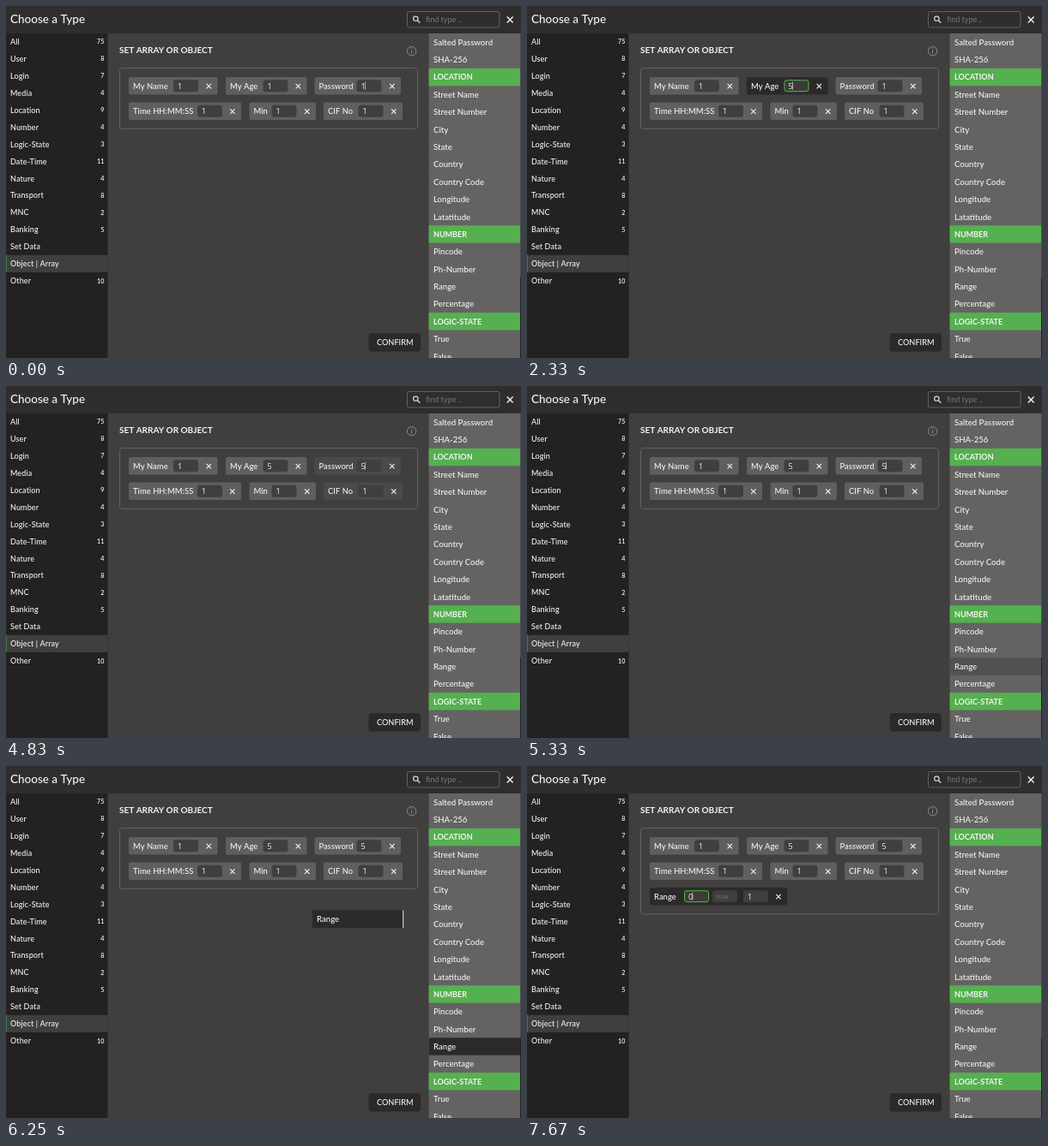
Write an HTML page with a canvas that moves like this. It is 600 px wide and 411 px high and loops after 8 s.

```html
<!DOCTYPE html>
<html lang="en">
<head>
<meta charset="utf-8">
<title>Choose a Type</title>
<style>
html, body { margin: 0; width: 100%; height: 100%; overflow: hidden; background: #403f3e; }
canvas { display: block; width: 600px; height: 411px; }
</style>
</head>
<body>
<canvas id="stage"></canvas>
<script>
const W = 600, H = 411, LOOP = 8000;
const canvas = document.getElementById('stage');
const ctx = canvas.getContext('2d');
const scale = window.devicePixelRatio || 1;
canvas.width = W * scale;
canvas.height = H * scale;

const FONT = 'Lato, "Open Sans", sans-serif';
const DIGITS = '"Open Sans", "Noto Sans", sans-serif';
const WHITE = '#f4f4f3', DARK = '#2b2a29', GREEN = '#55b04f', LINE = '#62615f';
const CHIP = [96, 95, 94], CHIP_HOVER = [43, 42, 41];
const ROW = [100, 99, 98];

const types = [
  ['All', 75], ['User', 8], ['Login', 7], ['Media', 4], ['Location', 9],
  ['Number', 4], ['Logic-State', 3], ['Date-Time', 11], ['Nature', 4],
  ['Transport', 8], ['MNC', 2], ['Banking', 5], ['Set Data', ''],
  ['Object | Array', ''], ['Other', 10]
];
const fields = [
  'Salted Password', 'SHA-256', '#LOCATION', 'Street Name', 'Street Number',
  'City', 'State', 'Country', 'Country Code', 'Longitude', 'Latatitude',
  '#NUMBER', 'Pincode', 'Ph-Number', 'Range', 'Percentage', '#LOGIC-STATE',
  'True', 'False'
];

const clamp = v => Math.max(0, Math.min(1, v));
const ramp = (t, a, b) => clamp((t - a) / (b - a));
const during = (t, a, b) => t >= a && t < b;
const ease = p => p * p * (3 - 2 * p);
const lerp = (a, b, p) => a + (b - a) * p;
const mix = (a, b, p) => `rgb(${a.map((v, i) => Math.round(lerp(v, b[i], p)))})`;
// 1 while hovered, fading in and out
const hover = (t, a, b, c, d) => ramp(t, a, b) * (1 - ramp(t, c, d));
// caret restarts its 500 ms blink at each keystroke or click
const blink = (t, start, end) => during(t, start, end) && Math.floor((t - start) / 500) % 2 === 0;

function rect(x, y, w, h, fill) {
  ctx.fillStyle = fill;
  ctx.fillRect(x, y, w, h);
}

function box(x, y, w, h, r, fill, stroke, line = 1) {
  ctx.beginPath();
  ctx.roundRect(x, y, w, h, r);
  if (fill) { ctx.fillStyle = fill; ctx.fill(); }
  if (stroke) { ctx.strokeStyle = stroke; ctx.lineWidth = line; ctx.stroke(); }
}

function text(str, x, mid, size, { color = WHITE, weight = 500, font = FONT, align = 'left', gap = 0 } = {}) {
  ctx.font = `${weight} ${size}px ${font}`;
  ctx.textAlign = align;
  ctx.letterSpacing = gap + 'px';
  ctx.fillStyle = color;
  ctx.fillText(str, x, mid + size * 0.36);
}

function path(points, color, width) {
  ctx.beginPath();
  points.forEach(([x, y, move]) => move ? ctx.moveTo(x, y) : ctx.lineTo(x, y));
  ctx.strokeStyle = color;
  ctx.lineWidth = width;
  ctx.stroke();
}

function cross(x, y, r, width) {
  path([[x - r, y - r, 1], [x + r, y + r], [x + r, y - r, 1], [x - r, y + r]], WHITE, width);
}

function ring(x, y, r, color, width) {
  ctx.beginPath();
  ctx.arc(x, y, r, 0, Math.PI * 2);
  ctx.strokeStyle = color;
  ctx.lineWidth = width;
  ctx.stroke();
}

function input(x, y, value, { hot = 0, caret = false, hint = '' } = {}) {
  box(x, y, 29, 14, 3, mix([64, 63, 62], [60, 59, 58], hot));
  if (hot > 0) {
    ctx.globalAlpha = hot;
    box(x + 0.5, y + 0.5, 28, 13, 2.5, null, GREEN);
    ctx.globalAlpha = 1;
  }
  if (value) text(value, x + 5, y + 7.1, 9, { font: DIGITS, weight: 400 });
  else if (hint) text(hint, x + 5, y + 7.2, 7.5, { color: '#6f6e6d', weight: 400 });
  if (caret) rect(x + (value ? 9.5 : 5), y + 2.5, 0.8, 9, '#d0cfce');
}

function chip(label, x, y, w, inputX, value, state = {}) {
  const dark = state.dark ?? state.hot ?? 0;
  box(x, y, w, 20.5, 2, mix(CHIP, CHIP_HOVER, dark));
  text(label, x + 5, y + 10.2, 9.4, { gap: 0.05 });
  if (inputX) {
    input(inputX, y + 3.2, value, state);
    cross(x + w - 10.2, y + 10.6, 2.7, 1.1);
  }
}

function header() {
  rect(0, 0, W, 32, '#2f2e2d');
  text('Choose a Type', 5, 15, 13.5);
  box(467.5, 6.5, 107.5, 18.5, 2, null, LINE);
  ring(477.3, 14.8, 2.7, '#d5d5d4', 1.2);
  path([[479.3, 16.8, 1], [482.3, 19.8]], '#d5d5d4', 1.3);
  text('find type ..', 489, 15.5, 9, { color: '#777675', weight: 400 });
  cross(587.2, 16, 3.4, 1.4);
}

function sidebar() {
  rect(0, 32, 118.5, H - 32, '#232221');
  types.forEach(([name, count], i) => {
    const y = 41.7 + i * 19.95;
    if (name === 'Object | Array') {
      rect(0, y - 10.2, 118.5, 20, '#403f3e');
      rect(0, y - 10.2, 1, 20, '#3c7a55');
    }
    text(name, 5, y, 9, { gap: 0.12 });
    text(count, 114.3, y, 7.2, { align: 'right', weight: 600 });
  });
}

function fieldList(t) {
  rect(492.6, 32, 106.4, H - 32, mix(ROW, ROW, 0));
  const hot = hover(t, 5250, 5500, 6780, 6920);
  fields.forEach((name, i) => {
    const y = 42.4 + i * 20.37;
    const head = name[0] === '#';
    const bar = fill => rect(492.6, y - 10.3, 106.4, 20.4, fill);
    if (head) bar(GREEN);
    if (name === 'Range' && hot) bar(mix(ROW, CHIP_HOVER, hot));
    text(head ? name.slice(1) : name, 498, y, head ? 9 : 9.6, { weight: head ? 700 : 500 });
  });
  rect(599, 32, 1, 285, '#4b4a49');
  rect(599, 317, 1, H - 317, '#232221');
}

function ageState(t) {
  return {
    value: t < 1750 ? '1' : t < 2330 ? '' : '5',
    hot: hover(t, 670, 920, 2830, 3000),
    caret: blink(t, 1170, 1750) || during(t, 1750, 2250) || blink(t, 2330, 3420)
  };
}

function passwordState(t) {
  return {
    value: t < 4000 ? '1' : t < 4330 ? '' : '5',
    hot: hover(t, 2830, 3000, 4750, 4830),
    dark: hover(t, 2830, 3000, 4700, 4920),
    caret: during(t, 0, 170) || during(t, 670, 1170) || blink(t, 3420, 4000) ||
      during(t, 4000, 4330) || during(t, 4330, 4920) || during(t, 5330, 5830)
  };
}

function panel(t) {
  const dropped = t >= 6750;
  text('SET ARRAY OR OBJECT', 132, 51.5, 10, { weight: 700 });
  ring(472.6, 52.7, 5.2, '#8f8e8d', 1);
  rect(472.1, 51.7, 1, 3.8, '#8f8e8d');
  rect(472.1, 49.6, 1, 1.1, '#8f8e8d');

  box(132.5, 72.5, 347, dropped ? 100.5 : 71, 3, null, LINE);
  const age = ageState(t), pass = passwordState(t);
  chip('My Name', 143, 83, 103.5, 195, '1');
  chip('My Age', 256, 83, 94.5, 299.5, age.value, age);
  chip('Password', 359.5, 83, 100.5, 408.5, pass.value, pass);
  chip('Time HH:MM:SS', 143, 112.5, 131, 223, '1');
  chip('Min', 283.5, 112.5, 77.5, 309.5, '1');
  // the pointer crosses this chip on its way down
  chip('CIF No', 370, 112.5, 92, 410.5, '1', { dark: 0.4 * hover(t, 4750, 4830, 4830, 4920) });
  if (dropped) rangeChip(t);

  box(422.5, 382, 60.5, 21.5, 4, DARK);
  text('CONFIRM', 432, 392.3, 9.2);
}

function rangeChip(t) {
  const y = 142;
  chip('Range', 143, y, 160, 0, '', { dark: ramp(t, 7000, 7250) });
  input(183, y + 3.2, t < 7670 ? '' : '0', {
    hot: ramp(t, 7420, 7670), caret: t >= 7500, hint: 'min'
  });
  input(216, y + 3.2, '', { hint: 'max' });
  input(252, y + 3.2, '1');
  cross(293, y + 10.6, 2.7, 1.1);
}

function dragged(t) {
  if (!during(t, 5960, 6750)) return;
  const first = ramp(t, 5960, 6250), second = ease(ramp(t, 6250, 6650));
  const p = Math.pow(first, 1.4);
  const x = lerp(lerp(493, 357, p), 283, second);
  const y = lerp(lerp(317.6, 168.5, p), 133, second);
  rect(x, y, 106, 20.5, DARK);
  rect(x + 105, y, 1.2, 20.5, '#c9c8c7');
  text('Range', x + 5, y + 10.2, 9.6);
}

function draw(now) {
  const t = Math.max(0, now - start) % LOOP;
  ctx.setTransform(scale, 0, 0, scale, 0, 0);
  rect(0, 0, W, H, '#403f3e');
  header();
  sidebar();
  fieldList(t);
  panel(t);
  dragged(t);
  requestAnimationFrame(draw);
}

const start = performance.now();
draw(start);
</script>
</body>
</html>
```
